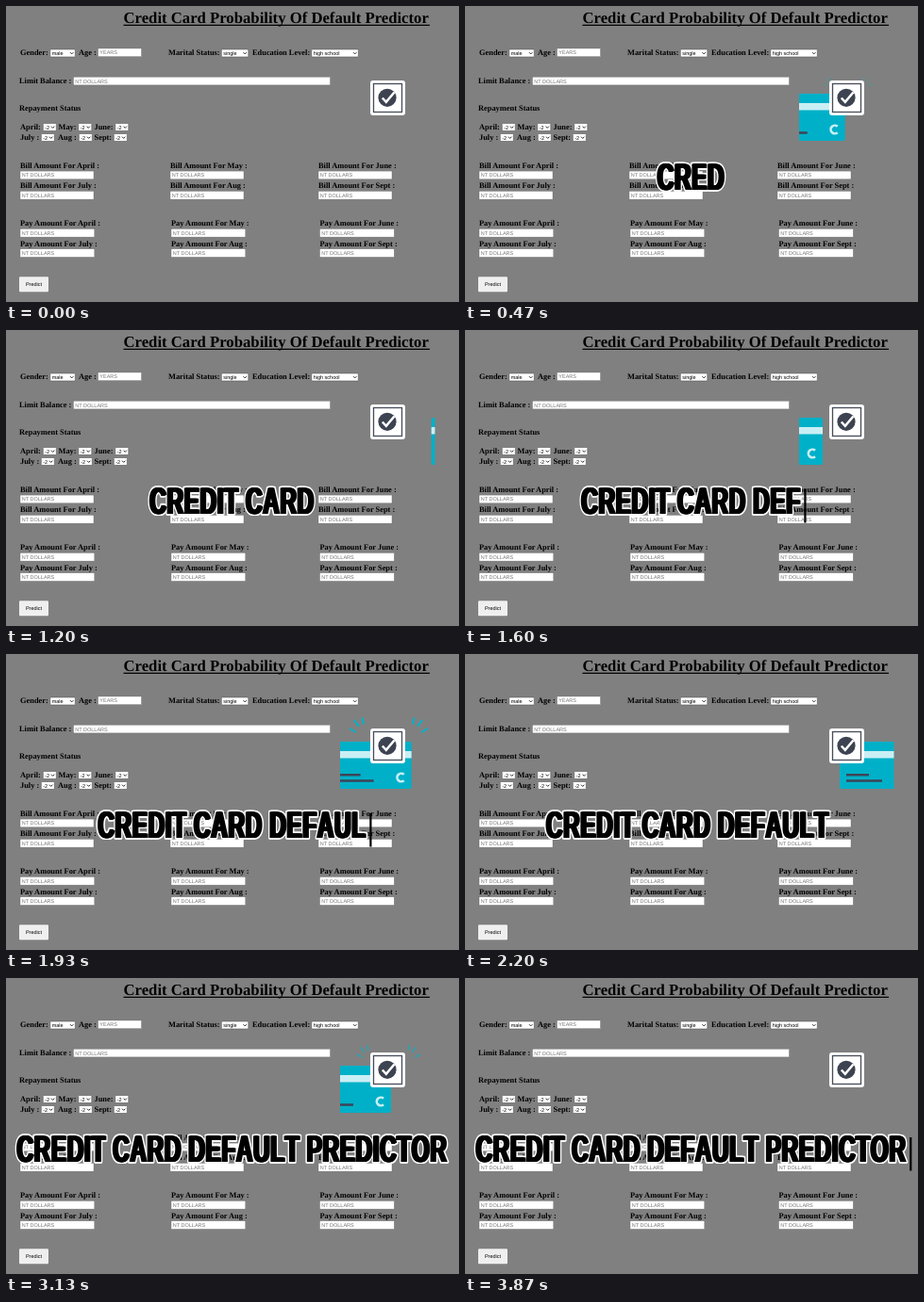
An HTML page that plays this animation: 480 by 314 pixels, repeating every 3.99 s.

```html
<!DOCTYPE html>
<html lang="en">
<head>
<meta charset="utf-8">
<title>Credit Card Default Predictor</title>
<style>
html, body { margin: 0; width: 100%; height: 100%; overflow: hidden; background: #808080; }
svg { display: block; width: 480px; height: 314px; }
text { white-space: pre; text-rendering: geometricPrecision; }
.label { font: bold 8.4px "Liberation Serif", "Times New Roman", serif; }
.title { font-size: 16.72px; }
.field { font: 5.5px "Liberation Sans", Arial, sans-serif; }
.hint { fill: #757575; }
.headline { font: bold 40px "Liberation Sans", Arial, sans-serif; font-kerning: none; letter-spacing: 1px; }
.halo { fill: #fff; stroke: #fff; stroke-width: 3.4; stroke-linejoin: round; }
</style>
</head>
<body>
<svg viewBox="0 0 480 314">
  <defs><clipPath id="window"><rect x="354" y="60" width="100.5" height="90"/></clipPath></defs>
  <g id="form"></g>

  <g id="sparks" stroke="#00b4cc" stroke-width="2" fill="none">
    <path d="M364 79l7 4M369 70l5 7M377.5 67.500l1.500 7"/>
    <path d="M432.500 67.500l-1.500 7M441 70l-5 7M447 79l-7 4"/>
  </g>
  <g clip-path="url(#window)">
    <g id="card">
      <rect y="93" width="85" height="50" rx="2" fill="#00b0c8"/>
      <rect y="103" width="85" height="7.500" fill="#c9eff5"/>
      <path d="M7 128.300h24M7 134.500h38" stroke="#3d4457" stroke-width="2.600"/>
      <path d="M77 127.800a4.300 4.300 0 1 0 0 6.400" fill="none" stroke="#c9eff5" stroke-width="2.600"/>
    </g>
  </g>
  <rect x="386" y="79" width="37" height="37" rx="3" fill="#fff"/>
  <rect x="389.500" y="82.500" width="30" height="30" fill="#fff" stroke="#454b58" stroke-width="1.300"/>
  <circle cx="404" cy="97.300" r="9.600" fill="#3d4350"/>
  <path d="M398.800 97.500l4 4.300L411.500 91.500" fill="none" stroke="#fff" stroke-width="2.500"/>

  <g id="headline"></g>
  <rect id="caret" y="169" width="2.200" height="35.500"/>
</svg>

<script>
const $ = id => document.getElementById(id);

// Static form
const label = (x, y, s) => `<text class="label" x="${x}" y="${y}">${s}</text>`;

const input = (x, y, w, hint) =>
  `<rect x="${x}" y="${y}" width="${w}" height="8.700" fill="#fff" stroke="#6c6c6c" stroke-width=".4"/>
   <text class="field hint" x="${x + 1.800}" y="${y + 6.300}">${hint}</text>`;

const select = (x, y, w, value) =>
  `<rect x="${x + .3}" y="${y}" width="${w}" height="8" rx=".8" fill="#fff" stroke="#555" stroke-width=".6"/>
   <text class="field" x="${x + 2.200}" y="${y + 6}">${value}</text>
   <path d="M${x + w - 5} ${y + 3.200}l1.700 1.700 1.700 -1.700" fill="none" stroke="#111" stroke-width=".9"/>`;

function amounts(kind, top, width, columns) {
  const months = [['April', 'July'], ['May', 'Aug'], ['June', 'Sept']];
  return columns.map((x, c) => months[c].map((month, r) => {
    const y = top + r * 21.300;
    return label(x, y, `${kind} Amount For ${month} :`) + input(x, y + 3.100, width, 'NT DOLLARS');
  }).join('')).join('');
}

const months = [
  ['April:', 15, 39, 0], ['May:', 55.500, 76.500, 0], ['June:', 93.500, 115.500, 0],
  ['July :', 15, 37, 1], ['Aug :', 55, 77, 1], ['Sept:', 93.500, 114, 1]
];

$('form').innerHTML =
  '<text class="label title" x="124.500" y="17.900">Credit Card Probability Of Default Predictor</text>' +
  '<path d="M124.500 20.300h324.500" stroke="#000" stroke-width="1.300"/>' +
  label(15, 52, 'Gender:') + select(46.500, 46, 26.500, 'male') +
  label(77, 51.500, 'Age :') + input(97.500, 45, 46, 'YEARS') +
  label(172, 52, 'Marital Status:') + select(228, 46, 28.500, 'single') +
  label(261, 52, 'Education Level:') + select(323.500, 46, 49.500, 'high school') +
  label(14, 81.500, 'Limit Balance :') + input(71.500, 75.200, 272, 'NT DOLLARS') +
  label(14, 110.500, 'Repayment Status') +
  months.map(([name, x, box, row]) =>
    label(x, 130.800 + row * 11, name) + select(box, 124.500 + row * 11, 14, '-2')).join('') +
  amounts('Bill', 172, 78, [15, 174, 331]) +
  amounts('Pay', 233.300, 78.800, [15, 175, 332.500]) +
  '<rect x="14" y="287.300" width="31" height="16" rx="1" fill="#efefef"/>' +
  '<text class="field" x="29.500" y="297.300" text-anchor="middle">Predict</text>';

// Condensed headline: white halo copies below, black copies on top
const phrase = 'CREDIT CARD DEFAULT PREDICTOR';
const condense = .609;
const copy = (dx, cls) =>
  `<text class="headline ${cls}" transform="translate(${dx} 195) scale(${condense} 1)"></text>`;
$('headline').innerHTML =
  [-1.800, -.9, 0, .9, 1.800].map(dx => copy(dx, 'halo')).join('') +
  [-1.450, -.7, 0, .7, 1.450].map(dx => copy(dx, '')).join('');
const copies = [...$('headline').children];

// Card position by step within one pass: [step, left edge]
const path = [[1.6, 269], [4.3, 294], [7.6, 323], [12, 379], [13.3, 397], [16.6, 436], [18.6, 457]];
const clamp = v => Math.max(0, Math.min(1, v));

function cardLeft(p) {
  const i = path.findIndex(([step]) => step >= p);
  if (i < 1) return i ? 500 : path[0][1];
  const [[a, x], [b, y]] = [path[i - 1], path[i]];
  return x + (y - x) * (p - a) / (b - a);
}

const loop = 3990, fps = 15, lastStep = 58, pass = 19.7;

function draw(ms) {
  const step = Math.min(lastStep, Math.floor((ms + 4) * fps / 1000));

  const typed = phrase.slice(0, step ? Math.floor(step * .61 + .5) : 0);
  if (copies[0].textContent !== typed) copies.forEach(c => c.textContent = typed);
  const width = copies[0].getComputedTextLength() * condense;
  const left = 242.5 - (width + 6) / 2;
  $('headline').setAttribute('transform', `translate(${left} 0)`);
  $('caret').setAttribute('x', left + width + 3.6);
  $('caret').setAttribute('opacity', step / fps % 1 >= .5 ? 1 : 0);

  const p = step % pass;
  $('card').setAttribute('transform', `translate(${cardLeft(p)} 0)`);
  const grow = clamp((p - 6.6) / 1.6);
  const size = .5 + .5 * grow;
  $('sparks').setAttribute('opacity', p > 12.9 ? 0 : grow);
  $('sparks').setAttribute('transform',
    `translate(405.5 88) scale(${size}) translate(-405.5 -88)`);
}

const start = performance.now();
function tick() {
  draw((performance.now() - start) % loop);
  requestAnimationFrame(tick);
}
tick();
</script>
</body>
</html>
```
